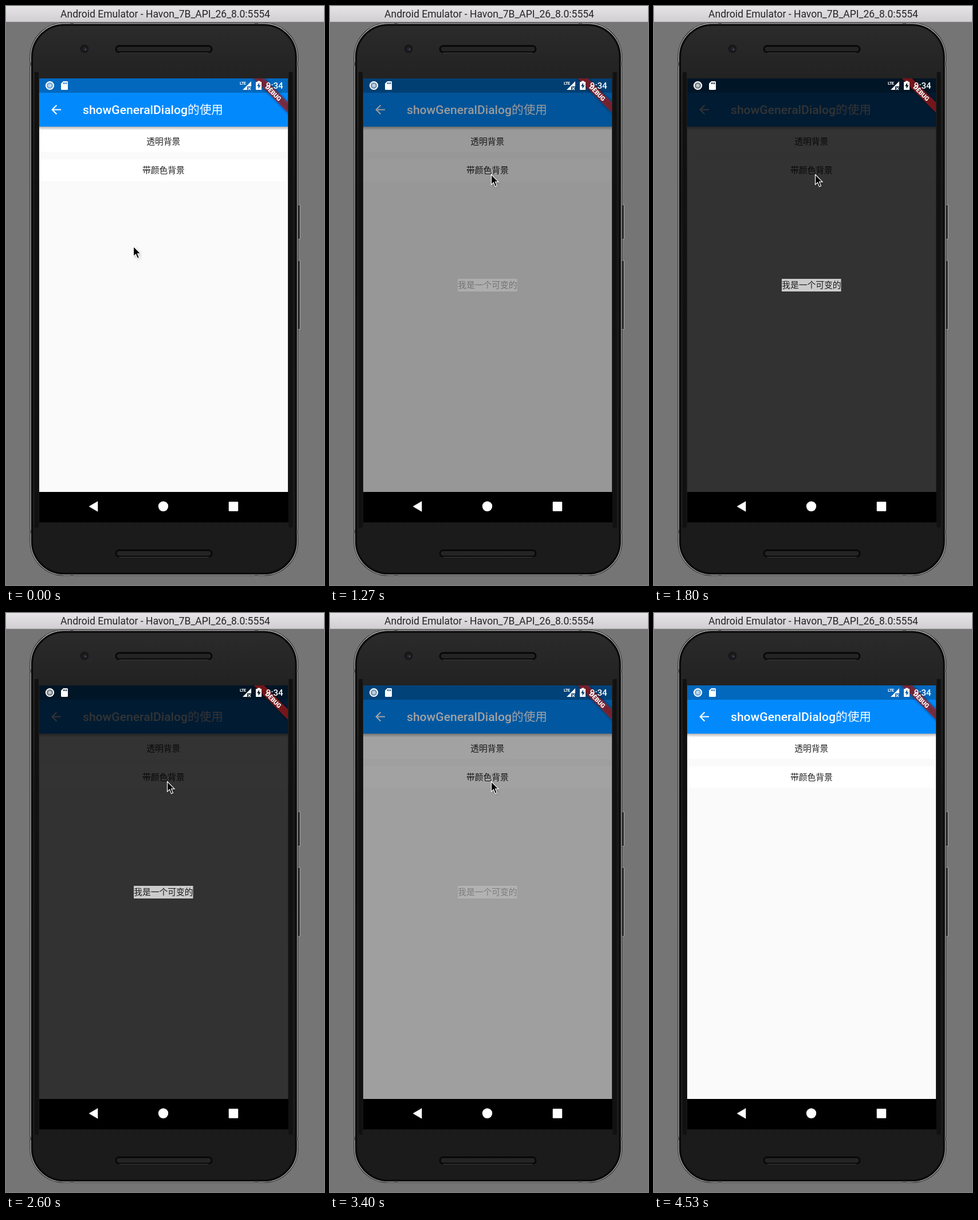
An HTML page that plays this animation: 555x1008 px, repeating every 4590 ms.

```html
<!DOCTYPE html>
<html lang="zh-CN">
<head>
<meta charset="utf-8">
<title>Dialog demo</title>
<style>
  html, body { margin: 0; height: 100%; overflow: hidden; background: #757575; }
  svg { display: block; width: 100vw; height: 100vh; }
  text { font-family: Roboto, "Noto Sans CJK SC", "Noto Sans CJK", sans-serif; }
  .label { font-size: 14.77px; fill: #000; fill-opacity: .87; text-anchor: middle; }
</style>
</head>
<body>
<svg viewBox="0 0 555 1008">
  <defs>
    <linearGradient id="titleBar" x2="0" y2="1">
      <stop stop-color="#e6e4e6"/><stop offset="1" stop-color="#d0ced0"/>
    </linearGradient>
    <linearGradient id="body" x2="0" y2="1">
      <stop stop-color="#2b2b2b"/><stop offset=".1" stop-color="#222"/>
      <stop offset=".3" stop-color="#191919"/><stop offset="1" stop-color="#1b1b1b"/>
    </linearGradient>
    <linearGradient id="barShadow" x2="0" y2="1">
      <stop stop-opacity=".28"/><stop offset="1" stop-opacity="0"/>
    </linearGradient>
    <filter id="blur" x="-20%" y="-80%" width="140%" height="260%"><feGaussianBlur stdDeviation="2.5"/></filter>
    <clipPath id="screen"><path d="M58 126H492V846H58z"/></clipPath>
    <g id="speaker">
      <rect width="170" height="14" rx="7" fill="#080808"/>
      <rect x="3" y="3" width="164" height="8" rx="4" fill="#242424"/>
      <path d="M7 13.5H163" stroke="#3c3c3c"/>
    </g>
  </defs>

  <rect width="555" height="1008" fill="#757575"/>
  <rect width="555" height="28" fill="url(#titleBar)"/>
  <path d="M0 27.5H555" stroke="#b0aeb0"/>
  <text x="278" y="20.3" font-size="17.5" text-anchor="middle" fill="#252525">Android Emulator - Havon_7B_API_26_8.0:5554</text>

  <!-- phone -->
  <g fill="#333" stroke="#aaa">
    <rect x="509.5" y="346" width="4" height="60" rx="1"/>
    <rect x="509.5" y="443" width="4" height="120" rx="1"/>
  </g>
  <rect x="41.5" y="29" width="468.5" height="963" rx="60" fill="#0c0c0c"/>
  <rect x="43" y="30.5" width="465.5" height="960" rx="58.5" fill="url(#body)" stroke="#bcbcbc" stroke-width="1.3"/>
  <rect x="45.5" y="33" width="460.5" height="955" rx="56" fill="none" stroke="#0a0a0a" stroke-width="3"/>
  <path d="M41 101h3M41 915h3M507 101h3M507 915h3M115 28.5v3M437 28.5v3M115 989v3M437 989v3" stroke="#555" stroke-width="6"/>
  <path d="M53.5 115V908M497 115V908" stroke="#111" stroke-width="7"/>
  <use href="#speaker" x="190.5" y="68"/>
  <use href="#speaker" x="190.5" y="946"/>
  <circle cx="137" cy="74.5" r="7.5" fill="#181818"/>
  <circle cx="137.5" cy="75" r="3.5" fill="#24222e"/>
  <circle cx="139" cy="75.5" r="1.2" fill="#57546a"/>

  <!-- app page -->
  <g clip-path="url(#screen)">
    <rect x="58" y="126" width="434" height="720" fill="#fafafa"/>
    <path d="M58 216H490.5V254H58zM58 267H490.5V305H58z" fill="#fff"/>
    <rect x="58" y="210" width="434" height="6" fill="url(#barShadow)"/>
    <rect x="58" y="126" width="434" height="84" fill="#028afd"/>
    <rect x="58" y="126" width="434" height="25" fill-opacity=".25"/>
    <path transform="translate(74.9 167.8) scale(1.055)" fill="#fff" d="M20 11H7.83l5.59-5.59L12 4l-8 8 8 8 1.41-1.41L7.83 13H20z"/>
    <text x="134" y="188.3" font-size="21.1" font-weight="500" fill="#fff">showGeneralDialog<tspan font-weight="400" font-size="20.7">的使用</tspan></text>
    <text class="label" x="274.8" y="241.2">透明背景</text>
    <text class="label" x="274.8" y="291.4">带颜色背景</text>

    <rect id="barrier" x="58" y="126" width="434" height="720"/>
    <g id="dialog">
      <rect x="223" y="475" width="103.5" height="22" fill="#fff" fill-opacity=".75"/>
      <text class="label" x="274.8" y="491.3">我是一个可变的</text>
    </g>

    <g transform="translate(492 126) rotate(45) scale(1.055)">
      <rect x="-50" y="28" width="100" height="12" fill-opacity=".5" filter="url(#blur)"/>
      <rect x="-50" y="28" width="100" height="12" fill="#b71c1c" fill-opacity=".627"/>
      <text y="37.7" font-size="10.2" font-weight="900" text-anchor="middle" fill="#fff">DEBUG</text>
    </g>
  </g>

  <!-- system icons -->
  <g fill="#fff">
    <circle cx="76.5" cy="138.5" r="6.6" fill-opacity=".45" stroke="#fff" stroke-width="2"/>
    <circle cx="76.5" cy="138.5" r="3" fill-opacity=".55"/>
    <path fill-rule="evenodd" d="M100 131h6.5q1.5 0 1.5 1.5v12q0 1.5-1.5 1.5h-9q-1.5 0-1.5-1.5V135zM100 133v3h1.3v-3zM102.5 133v3h1.3v-3zM105 133v3h1.3v-3z"/>
    <text x="408" y="137.3" font-size="7.5" font-weight="700" letter-spacing="-.6">LTE</text>
    <path d="M428 131v9h-7v6h-8z"/>
    <path d="M422.5 141.5l4.5 4.5m0-4.5l-4.5 4.5" stroke="#fff" stroke-width="1.3"/>
    <path fill-rule="evenodd" d="M439 130.5h4.500v1.500h2.500v14h-10v-14h3zM442 133.500l-4 6h2.500v4.500l4-6H442z"/>
    <text x="453.8" y="143.8" font-size="15.200" font-weight="500">9:34</text>
  </g>

  <rect x="58" y="846" width="435" height="53"/>
  <g fill="#fff">
    <path d="M145 871.3L160 862.500V880z" stroke="#fff" stroke-linejoin="round" stroke-width=".6"/>
    <circle cx="274.5" cy="871" r="8.7"/>
    <rect x="388.7" y="863" width="16.5" height="16.5" rx="1"/>
  </g>

  <circle id="ring" cx="281.2" cy="295" r="27.3" fill="none" stroke="#000" stroke-width="2"/>
  <g id="cursor">
    <path d="M1 2V19L5 15.500L8 22L11 20.700L8 14.500H13z" fill-opacity=".35" filter="url(#blur)"/>
    <path d="M0 0V17.500L4 13.800L7 21L10 19.700L7 12.700H12.500z" stroke="#fff" stroke-width="1.2"/>
  </g>
</svg>
<script>
const LOOP = 4590;
const $ = id => document.getElementById(id);

// time, x, y
const cursorPath = [
  [70, 222.5, 418.5], [530, 190, 176], [670, 281, 305], [730, 281.5, 293.5],
  [3850, 281.5, 293.5], [4150, 230, 164], [4460, 172, 14]
];
// time, dialog transition progress
const dialogPath = [
  [1070, 0], [1270, .29], [1770, 1], [3070, 1], [3200, .51], [3530, .12], [3630, 0]
];

function sample(path, t) {
  if (t <= path[0][0]) return path[0].slice(1);
  const i = path.findIndex(key => key[0] > t);
  if (i < 0) return path.at(-1).slice(1);
  const a = path[i - 1], b = path[i];
  const k = (t - a[0]) / (b[0] - a[0]);
  return a.slice(1).map((v, n) => v + (b[n + 1] - v) * k);
}

// cubic-bezier(.25, .1, .25, 1)
function ease(x) {
  if (x <= 0 || x >= 1) return x;
  const bezier = (s, p1, p2) => 3 * s * (1 - s) ** 2 * p1 + 3 * s * s * (1 - s) * p2 + s ** 3;
  let low = 0, high = 1;
  for (let i = 0; i < 20; i++) {
    const mid = (low + high) / 2;
    if (bezier(mid, .25, .25) < x) low = mid; else high = mid;
  }
  return bezier(low, .1, 1);
}

const during = (t, from, to) => t >= from && t < to ? 1 : 0;

function draw(t) {
  const [x, y] = sample(cursorPath, t);
  const [progress] = sample(dialogPath, t);
  $('cursor').setAttribute('transform', `translate(${x} ${y})`);
  $('cursor').setAttribute('opacity', during(t, 0, 4460));
  $('ring').setAttribute('opacity', during(t, 870, 1070) || during(t, 2870, 3070));
  $('barrier').setAttribute('opacity', .8 * ease(progress));
  $('dialog').setAttribute('opacity', progress);
}

const start = performance.now();
function tick() {
  draw((performance.now() - start) % LOOP);
  requestAnimationFrame(tick);
}
tick();
</script>
</body>
</html>
```
